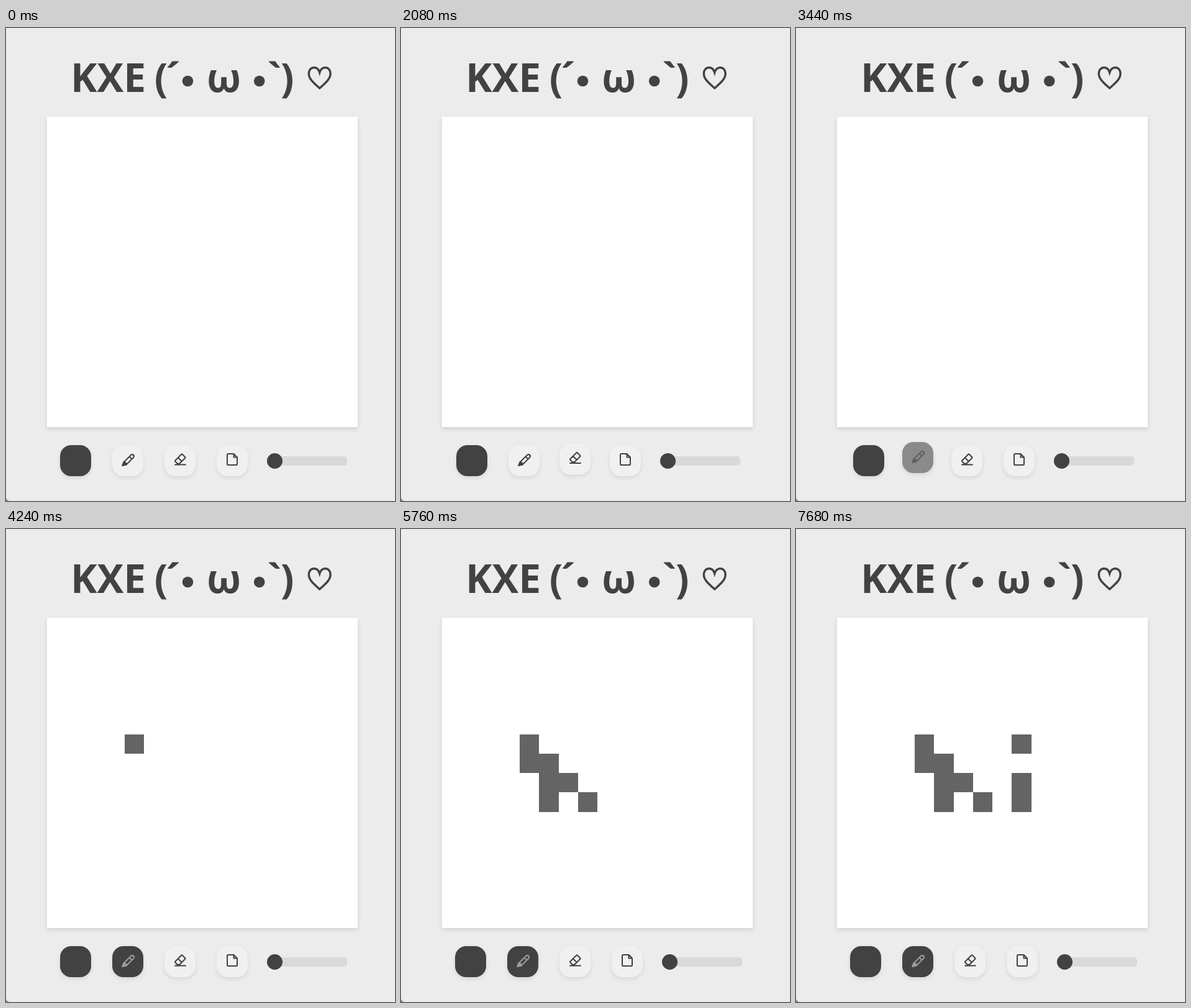
An HTML page for the animation above (8 s loop, 626x762 px).

```html
<!DOCTYPE html>
<html lang="en">
<head>
<meta charset="utf-8">
<title>KXE</title>
<style>
  html, body { margin: 0; width: 100%; height: 100%; overflow: hidden; background: #ececec; }

  .app {
    --dark: #424242;
    /* hover amount of each button, and number of painted cells */
    --a: 0; --b: 0; --c: 0; --d: 0; --n: 0;
    position: absolute; left: 0; top: 0; width: 626px; height: 762px; overflow: hidden;
    background: #ececec; color: var(--dark);
    animation: play 8s step-end infinite;
  }
  .app > * { position: absolute; }

  .title { left: 0; top: 0; width: 626px; height: 130px; fill: var(--dark);
    font: 700 64px "Noto Sans", "Open Sans", sans-serif; }
  .corner { left: 0; bottom: 0; width: 7px; height: 7px;
    background: radial-gradient(circle at 100% 0, transparent 6.6px, #8c8c8c 7.6px); }

  .board { left: 66px; top: 143px; width: 500px; height: 500px; background: #fff;
    box-shadow: 0 3px 7px rgba(0, 0, 0, .12); }
  .board i { position: absolute; width: 31.25px; height: 31.25px; background: #646464;
    left: calc(31.25px * var(--x)); top: calc(31.25px * var(--y));
    opacity: calc(var(--n) - var(--i)); }

  .btn { top: 672px; width: 50px; height: 50px; border-radius: 18px; background: #f0f0f0;
    box-shadow: 0 3px 7px rgba(0, 0, 0, .09);
    left: calc(var(--x) + 5px * var(--shift));
    transform: translateY(calc(-5px * var(--up))); }
  .btn svg { display: block; width: 50px; height: 50px; fill: none; stroke: currentColor;
    stroke-width: 2; stroke-linejoin: round; stroke-linecap: round; }
  .swatch { --x: 86.7px; --up: var(--a); --shift: calc(var(--b) + var(--c) + var(--d)); background: var(--dark); }
  .pencil { --x: 170.7px; --up: var(--b); --shift: calc(var(--c) + var(--d) - var(--a));
    animation: select 8s step-end infinite; }
  .eraser { --x: 254.7px; --up: var(--c); --shift: calc(var(--d) - var(--a) - var(--b)); }
  .page { --x: 338.7px; --up: var(--d); --shift: calc(0 - var(--a) - var(--b) - var(--c)); }

  .slider { top: 690px; width: 129px; height: 15px; border-radius: 5px; background: #d9d9d9;
    left: calc(419.7px - 5px * (var(--a) + var(--b) + var(--c) + var(--d))); }
  .slider b { position: absolute; left: 0; top: -5px; width: 25px; height: 25px;
    border-radius: 50%; background: var(--dark); }

  @keyframes play {
    0% { --a: 0; --b: 0; --c: 0; --d: 0; --n: 0; }
    12% { --a: .5; }
    13% { --a: 1; }
    15% { --a: .5; }
    16% { --a: 0; }
    17% { --b: .1; }
    18% { --b: 1; }
    20% { --b: .5; }
    21% { --b: 0; }
    22% { --c: .5; }
    23% { --c: 1; }
    26% { --c: .5; }
    27% { --c: 0; --d: .5; }
    28% { --d: 1; }
    32% { --d: .5; }
    33% { --d: 0; }
    34% { --c: .5; }
    35% { --c: 1; }
    38% { --c: .5; }
    39% { --c: 0; --b: .5; }
    40% { --b: 1; }
    46% { --b: .5; }
    47% { --b: 0; }
    53% { --n: 1; }
    55% { --n: 3; }
    56% { --n: 4; }
    60% { --n: 5; }
    68% { --n: 6; }
    72% { --n: 7; }
    85% { --n: 8; }
    87% { --n: 9; }
    96% { --n: 10; }
    100% { --a: 0; --b: 0; --c: 0; --d: 0; --n: 10; }
  }
  @keyframes select {
    0% { background: #f0f0f0; color: #424242; }
    43% { background: #8a8a8a; color: #606060; }
    44%, 100% { background: #424242; color: #9c9c9c; }
  }
</style>
</head>
<body>
<div class="app">
  <svg class="title" viewBox="0 0 626 130">
    <text x="104" y="103">KXE</text>
    <text x="249.5 269 350.5 431.5 452.5" y="103" text-anchor="middle">(´ω`)</text>
    <circle cx="292.5" cy="85.5" r="8.8"/>
    <circle cx="407.7" cy="85.5" r="8.8"/>
    <path d="M504.7 97C495 88.5 487.3 82 487.3 73.5C487.3 67.500 491 63.800 495.800 63.800C500.300 63.800 503.300 67 504.700 71.800C506.100 67 509.200 63.800 513.600 63.800C518.400 63.800 522.100 67.500 522.100 73.500C522.100 82 514.400 88.500 504.700 97Z" fill="none" stroke="#424242" stroke-width="3.4"/>
  </svg>

  <div class="board">
    <i style="--i:0;--x:4;--y:6"></i>
    <i style="--i:1;--x:4;--y:7"></i>
    <i style="--i:2;--x:5;--y:7"></i>
    <i style="--i:3;--x:5;--y:8"></i>
    <i style="--i:4;--x:5;--y:9"></i>
    <i style="--i:5;--x:6;--y:8"></i>
    <i style="--i:6;--x:7;--y:9"></i>
    <i style="--i:7;--x:9;--y:8"></i>
    <i style="--i:8;--x:9;--y:9"></i>
    <i style="--i:9;--x:9;--y:6"></i>
  </div>

  <div class="btn swatch"></div>
  <div class="btn pencil">
    <svg viewBox="0 0 50 50">
      <path d="M19.500 26.500L30.500 15.500Q32 14.300 33.600 15.700L34.300 16.400Q35.700 18 34.500 19.500L23.500 30.500Z M27.500 18.500L31.500 22.500"/>
      <path d="M18.200 26.800L23.200 31.800L15.800 33.200Z M33 14.500L35.500 17" fill="currentColor" stroke-width="1.400"/>
    </svg>
  </div>
  <div class="btn eraser">
    <svg viewBox="0 0 50 50">
      <path d="M17.300 24.700L27.300 14.700Q28 14 28.700 14.700L33.300 19.300Q34 20 33.300 20.700L24.200 29.800H20.800L17.300 26.300Q16.500 25.500 17.300 24.700Z M21.800 20.200L28 26.200M17 31.500H34"/>
    </svg>
  </div>
  <div class="btn page">
    <svg viewBox="0 0 50 50">
      <path d="M27.500 14H18.500Q17 14 17 15.500V30.500Q17 32 18.500 32H31.500Q33 32 33 30.500V19.500Z M27.500 14V19.500H33"/>
    </svg>
  </div>
  <div class="slider"><b></b></div>
  <div class="corner"></div>
</div>
</body>
</html>
```
